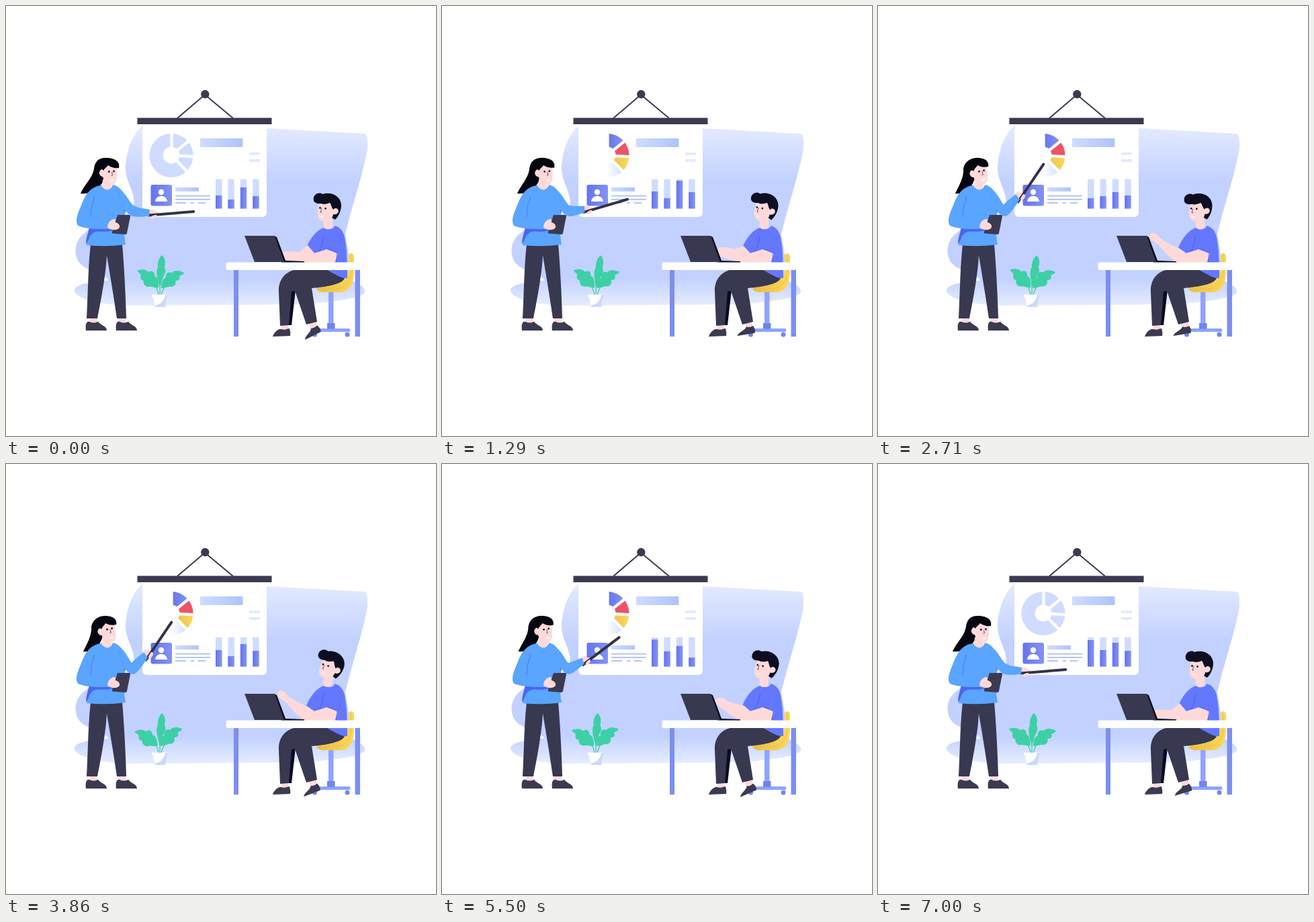
Animation of 640 by 640 pixels, one loop 7070 ms. Source, as an HTML page:

```html
<!DOCTYPE html>
<html lang="en">
<head>
<meta charset="utf-8">
<title>Presentation</title>
<style>
html, body { margin: 0; width: 100%; height: 100%; overflow: hidden; background: #fff; }
svg { display: block; width: 100vw; height: 100vh; }
</style>
</head>
<body>
<svg viewBox="0 0 640 640" xmlns="http://www.w3.org/2000/svg">
<defs>
  <linearGradient id="blob" gradientUnits="userSpaceOnUse" x1="0" y1="178" x2="0" y2="262">
    <stop offset="0" stop-color="#e4ebff"/><stop offset="1" stop-color="#c2d1ff"/>
  </linearGradient>
  <linearGradient id="ground" gradientUnits="userSpaceOnUse" x1="0" y1="405" x2="0" y2="446">
    <stop offset="0" stop-color="#c2d1ff"/><stop offset="1" stop-color="#e6edff"/>
  </linearGradient>
  <linearGradient id="strip"><stop stop-color="#d0dcff"/><stop offset="1" stop-color="#adc4fb"/></linearGradient>
  <linearGradient id="violet"><stop stop-color="#6474ec"/><stop offset="1" stop-color="#8492f5"/></linearGradient>
  <linearGradient id="gold"><stop stop-color="#e9bd49"/><stop offset="1" stop-color="#fbd85a"/></linearGradient>
  <linearGradient id="faded" gradientUnits="userSpaceOnUse" x1="246" y1="0" x2="268" y2="0">
    <stop offset="0" stop-color="#fff"/><stop offset="1" stop-color="#d5e0ff"/>
  </linearGradient>
</defs>

<!-- backdrop -->
<path fill="url(#blob)" d="M203 178C186 194 178 220 178 243C179 264 194 280 190 298C183 316 148 320 124 333C104 344 100 362 106 377C115 396 143 393 154 410H514V393L505 340C514 300 533 245 538 212Q539 192 534 190L388 182Z"/>
<path fill="url(#ground)" d="M102 423C102 412 140 408 200 406H505C528 413 535 420 534 426C531 436 480 441 440 444L180 446C132 444 102 434 102 423Z"/>

<!-- screen -->
<path d="M203 172H388V307Q388 314 381 314H210Q203 314 203 307Z" fill="#fff"/>
<path d="M255 167L296 132L338 167" fill="none" stroke="#3b3a50" stroke-width="2"/>
<circle cx="296.3" cy="131.3" r="6.2" fill="#3b3a50"/>
<rect x="195.500" y="166.500" width="200" height="9.500" fill="#3b3a50"/>
<g id="pale" fill="#d0dcff"></g>
<g id="vivid"></g>
<path d="M246.500 188V222M246 222L272.500 200.500M246 222.500L282 224.300M246 222L272 249" stroke="#fff" stroke-width="4.300"/>
<circle cx="246" cy="222" r="12.500" fill="#fff"/>
<rect x="289" y="197" width="63.500" height="13" rx="1" fill="url(#strip)"/>
<path d="M362 220H378M362 230H378" stroke="#e3eaff" stroke-width="4"/>
<rect x="215.500" y="266" width="31.500" height="31.500" rx="3" fill="url(#violet)"/>
<circle cx="231" cy="277" r="4.200" fill="#fff"/>
<path d="M222 291C223 280 239 280 240 291Z" fill="#fff"/>
<rect x="252" y="270" width="35" height="6" fill="url(#strip)"/>
<path d="M252 282.700H304M252 287.900H304M252 293.200H268M275 293.200H280M286 293.200H297" stroke="#a9bffa" stroke-width="1.700"/>
<g id="bars"></g>

<!-- plant -->
<g fill="#3dd0a5">
  <path d="M229 430V395M227 430Q226 420 218 412M231 430Q234 418 242 411" fill="none" stroke="#3dd0a5" stroke-width="1.300"/>
  <path id="leafTop" d="M232 371C238 375 237 384 236 389C240 396 234 401 233 406L229 420C226 408 222 396 226 389C225 382 228 374 232 371Z"/>
  <path id="leafLeft" d="M195 394C202 391 209 392 212 396C219 392 222 398 221 402C227 404 227 413 227 419C221 420 217 417 213 418C206 418 204 413 205 409C199 408 200 402 201 400C198 397 197 396 195 394Z"/>
  <path id="leafRight" d="M265 397C258 393 250 393 247 397C240 394 237 400 238 404C232 406 231 415 231 420C238 420 242 417 246 418C253 417 253 412 252 409C259 409 259 405 258 402C261 400 263 401 265 397Z"/>
</g>
<path d="M217 429.500H241V433L239.500 433.500L237 448H222L219 433.500L217 433Z" fill="#fff"/>
<path d="M241 430V433L239.500 433.500L237 448H222L221.500 446C231 444 236 437 237 430Z" fill="#cbd8ff"/>

<!-- presenter -->
<g>
  <path fill="#ffd9d9" d="M125 462H136L135 472H124ZM166 462H178L179 472H168Z"/>
  <path id="shoe" fill="#3b3a50" d="M119 483C118 475 119 470 123 469.500C128 472 134 472 137 469.500C141 476 150 476 150 483Z"/>
  <use href="#shoe" x="45"/>
  <path fill="#383850" d="M126 354H173C176 390 178 430 179 465H165C160 430 154 395 150 371C149 395 143 430 136 465H120C122 430 122 390 126 354Z"/>
  <path id="hair" fill="#060610"/>
  <path fill="#59a5ff" d="M142 268C150 276 157 273 159 266C172 269 178 281 178 300C177 320 174 336 178 355Q150 359 120 356C120 345 127 325 125 305C125 290 130 274 142 268Z"/>
  <path fill="#4b66ee" d="M124 328L160 333C150 339 138 333 131 337C123 341 124 350 119 354C119 344 123 336 124 328ZM168 282C177 288 180 297 177 309C176 300 172 290 168 282Z"/>
  <path fill="#59a5ff" d="M143 267C127 268 119 279 113 294C109 304 105 312 105 320Q105 327 110 328C125 333 145 332 157 332L155 319C145 319 135 318 126 315C130 300 132 290 136 280Z"/>
  <path d="M132 283Q126 298 126 314" fill="none" stroke="#4b74ee" stroke-width=".9"/>
  <path fill="#ffd9d9" d="M144 258L157 262V269C154 276 147 274 143 269Z"/>
  <g id="face">
    <path fill="#ffd9d9" d="M145 236H164C166 245 166 258 162 264C158 269 147 267 144 254C138 254 137 244 142 243Z"/>
    <path fill="#060610" d="M139 240C141 228 150 225 156 227C164 228 170 233 168 241C162 242 156 240 152 237C150 240 147 241 145 245C142 241 140 244 139 248Z"/>
    <g id="eyes" fill="#14142a"><circle cx="153.300" cy="246.500" r="1.400"/><circle cx="160.500" cy="246" r="1.400"/></g>
    <path d="M157.500 247L158.500 252L156.500 252.500" fill="none" stroke="#4b3548" stroke-width=".8"/>
    <path d="M155 258Q158 260 161 257Q160 262 157 261Z" fill="#fff"/>
  </g>
  <path d="M166 311H184Q185.500 311 185 313L180 338Q179.500 340 178 340L159 338.500Q157 338 158 336Z" fill="#3b3a50"/>
  <path d="M151 330C151 322 156 318 161 317C165 318 162 321 163 322C168 323 171 328 168 331C163 335 156 333 151 330Z" fill="#ffd9d9"/>
  <path id="hand" fill="#ffd9d9"/>
  <path id="pointer" d="M0 0H67.500" stroke="#333347" stroke-width="4" stroke-linecap="round"/>
  <path id="fingers" stroke="#ffd9d9" stroke-width="4" stroke-linecap="round"/>
  <path id="arm" fill="#59a5ff"/>
</g>

<!-- chair -->
<rect x="480" y="424" width="7.500" height="50" fill="#8fa3ff"/>
<path d="M460 480H511Q513 481 512 485H460Z" fill="#8fa3ff"/>
<rect x="478" y="472" width="11.500" height="8.500" fill="#6f84ee"/>
<g fill="#7088f0"><circle cx="459.500" cy="489" r="3.500"/><circle cx="508" cy="489" r="3.500"/></g>
<path fill="url(#gold)" d="M510 373Q510 368 514 368Q518 369 518 374V395C518 413 512 426 496 426H470Q462 425 462 417L504 405Q510 400 510 390Z"/>
<path d="M514 370V395C513 410 506 420 490 421L463 422" fill="none" stroke="#eac04a" stroke-width="1"/>

<!-- listener -->
<path fill="#ffd9d9" d="M410 473H420L421 483H410ZM449 470L461 468L463 479L454 481Z"/>
<path fill="#3b3a50" d="M397 492C400 484 406 480 410 481C415 483 419 480 422 480Q424 486 423 491Z"/>
<path id="foot" fill="#3b3a50" d="M439 490C441 484 451 483 453 477Q458 479 463 476Q467 482 465 487Z"/>
<path fill="#0a0a25" d="M421 422H431L425 475H420Z"/>
<path fill="#6478ff" d="M474 330C482 334 488 332 489 327C498 329 504 337 505 350Q508 365 508 405H480L455 393L458 368L447 360C452 347 463 332 474 330Z"/>
<path fill="#383850" d="M434 392H476C488 398 496 404 504 405C500 415 475 418 455 420L463 470L447 474L430 424L425 425L421 475L408 476L406 426C405 407 416 394 434 392Z"/>
<path d="M464 366C473 358 470 348 474 342" fill="none" stroke="#4a5ce6" stroke-width="1"/>
<path id="reach" fill="#ffd9d9"/>
<path fill="#ffd9d9" d="M477 362C465 367 455 368 445 372C440 376 436 380 444 382H490C494 378 495 371 493 368Z"/>
<path fill="#6478ff" d="M474 360Q485 362 494 368L490 381H500V350L486 342Z"/>
<path d="M477 361Q486 363 493 368L491 381" fill="none" stroke="#4a5ce6" stroke-width=".7"/>
<g id="head">
  <path fill="#ffd9d9" d="M472 313H486V327C484 334 474 334 473 328Z"/>
  <path fill="#0e0e22" d="M458 290C456 281 465 276 471 280C483 276 498 282 499 296C499 305 495 313 490 318L483 314L470 294Q460 295 458 290Z"/>
  <path fill="#ffd9d9" d="M466 294C474 296 479 294 482 293C484 295 484 299 487 303C491 298 497 303 494 308Q491 311 487 310C486 317 481 320 474 320C464 320 463 312 464 304Z"/>
  <g fill="#14142a"><circle cx="467.500" cy="300.500" r="1.400"/><circle cx="475.500" cy="301.500" r="1.400"/></g>
  <path d="M470 301L468 307H470" fill="none" stroke="#4b3548" stroke-width=".8"/>
  <path d="M467 312Q470 314 473 312Q471 317 467 312Z" fill="#fff"/>
</g>

<!-- desk -->
<path fill="#0b0b1f" d="M399 342L403 344L416 379L444 380V382H410Z"/>
<path fill="#383850" d="M355 342H400L414 381H370Z"/>
<path fill="#7c8ff0" d="M339 392H346V492H339ZM519.500 392H527V492H519.500Z"/>
<rect x="327.500" y="381.500" width="199.500" height="11.500" rx="2" fill="#fff"/>
</svg>

<script>
const LOOP = 7070;
const $ = id => document.getElementById(id);
const clamp = x => Math.min(1, Math.max(0, x));
const smooth = x => x * x * (3 - 2 * x);
const ease = (t, a, b) => smooth(clamp((t - a) / (b - a)));
const mix = (a, b, p) => a + (b - a) * p;

function keyed(times, values, t) {
  let i = times.length - 1;
  while (i > 0 && times[i] > t) i--;
  if (i === times.length - 1) return values[i];
  return mix(values[i], values[i + 1], ease(t, times[i], times[i + 1]));
}

// Blends two paths that share the same commands.
function morph(from, to, p) {
  const ends = to.match(/-?[\d.]+/g);
  let i = 0;
  return from.replace(/-?[\d.]+/g, n => mix(+n, +ends[i++], p).toFixed(2));
}

function add(parent, tag, attrs) {
  const node = document.createElementNS('http://www.w3.org/2000/svg', tag);
  for (const name in attrs) node.setAttribute(name, attrs[name]);
  return $(parent).appendChild(node);
}

function sector(a, b) {
  const at = deg => {
    const r = deg * Math.PI / 180;
    return `${246 + 32.5 * Math.sin(r)} ${222.5 - 32.5 * Math.cos(r)}`;
  };
  return `M246 222.5L${at(a)}A32.5 32.5 0 ${b - a > 180 ? 1 : 0} 1 ${at(b)}Z`;
}

[[0, 50, 'url(#violet)'], [50, 93, '#ec5468'], [93, 136, 'url(#gold)'], [136, 360, 'url(#faded)']]
  .forEach(([a, b, fill]) => {
    add('pale', 'path', { d: sector(a, b) });
    add('vivid', 'path', { d: sector(a, b), fill });
  });

const TIMES = [0, 1290, 2710, 3860, 4860, 6210, 7000];
const LEVELS = [
  [282, 276, 286, 277, 259, 264, 262],
  [288, 286, 283, 286, 276, 282, 277],
  [270, 260, 277, 268, 268, 274, 266],
  [283, 277, 282, 278, 289, 287, 278]
];
const bars = LEVELS.map((levels, i) => {
  const x = 312 + i * 18.4, width = 9.4;
  add('bars', 'rect', { x, y: 258, width, height: 43.5, fill: '#d0dcff' });
  return add('bars', 'rect', { x, width, fill: 'url(#violet)' });
});

const POSES = {
  hair: ['M168 240C169 232 160 226 150 226C138 225 132 232 131 242C129 256 117 265 111 279C125 281 139 272 144 262L152 240Z',
         'M163 239C163 231 157 226 148 226C137 226 129 232 127 242C128 256 120 268 115 279C128 281 138 272 142 262L150 240Z'],
  arm: ['M166 270C178 277 184 293 190 297C196 301 205 301 214 303L213 313C203 314 193 314 188 313C180 308 174 302 172 296Z',
        'M166 270C178 277 184 293 187 296C191 291 199 285 205 280L211 288C205 297 196 312 189 313C181 312 174 302 172 296Z'],
  hand: ['M211 303C216 302 221 302 224 306C229 307 228 310 224 311C226 315 220 317 216 316L211 312Z',
         'M204 281C206 276 210 274 211 278C215 276 218 278 216 281C221 281 219 286 215 289L209 289Z'],
  fingers: ['M219 314L223 313', 'M214 287L217 282'],
  reach: ['M449 356C444 359 441 363 437 366C430 366 420 365 413 366C408 367 409 377 414 378L428 379L440 381L459 368Z',
          'M449 361C441 358 430 352 420 346C416 338 407 333 404 342C402 347 412 350 418 356L431 371L441 379L459 368Z']
};

const turn = (id, angle, x, y) => $(id).setAttribute('transform', `rotate(${angle.toFixed(2)} ${x} ${y})`);

function draw(t) {
  const lift = ease(t, 980, 1980) - ease(t, 5090, 6090);
  for (const id in POSES) $(id).setAttribute('d', morph(...POSES[id], lift));
  $('pointer').setAttribute('transform',
    `translate(${mix(212, 208.5, lift)} ${mix(311.5, 291.5, lift)}) rotate(${mix(-4.7, -56, lift)})`);

  turn('face', -8 * lift, 150, 266);
  $('eyes').style.display = t > 6140 && t < 6290 ? 'none' : '';
  turn('head', keyed(TIMES, [0, 3.5, -3.5, 11, 11, 0, 0], t), 482, 322);
  turn('foot', -10 - 10 * Math.cos(t * 2 * Math.PI / 800), 461, 476);

  const color = ease(t, 950, 1250) - ease(t, 5700, 6050);
  $('vivid').setAttribute('opacity', color);
  $('pale').setAttribute('opacity', 1 - color);
  bars.forEach((bar, i) => {
    const y = keyed(TIMES, LEVELS[i], t);
    bar.setAttribute('y', y);
    bar.setAttribute('height', 301.5 - y);
  });

  turn('leafTop', keyed(TIMES, [0, 4, 4, 0, -1, 0, 0], t), 229, 430);
  turn('leafLeft', keyed(TIMES, [0, 1, 2, -7, -1.5, -7, -1], t), 229, 428);
  turn('leafRight', keyed(TIMES, [0, -2, -2, -5, -6, -2, 0], t), 230, 428);
}

const start = performance.now();
function tick() {
  draw((performance.now() - start) % LOOP);
  requestAnimationFrame(tick);
}
tick();
</script>
</body>
</html>
```
